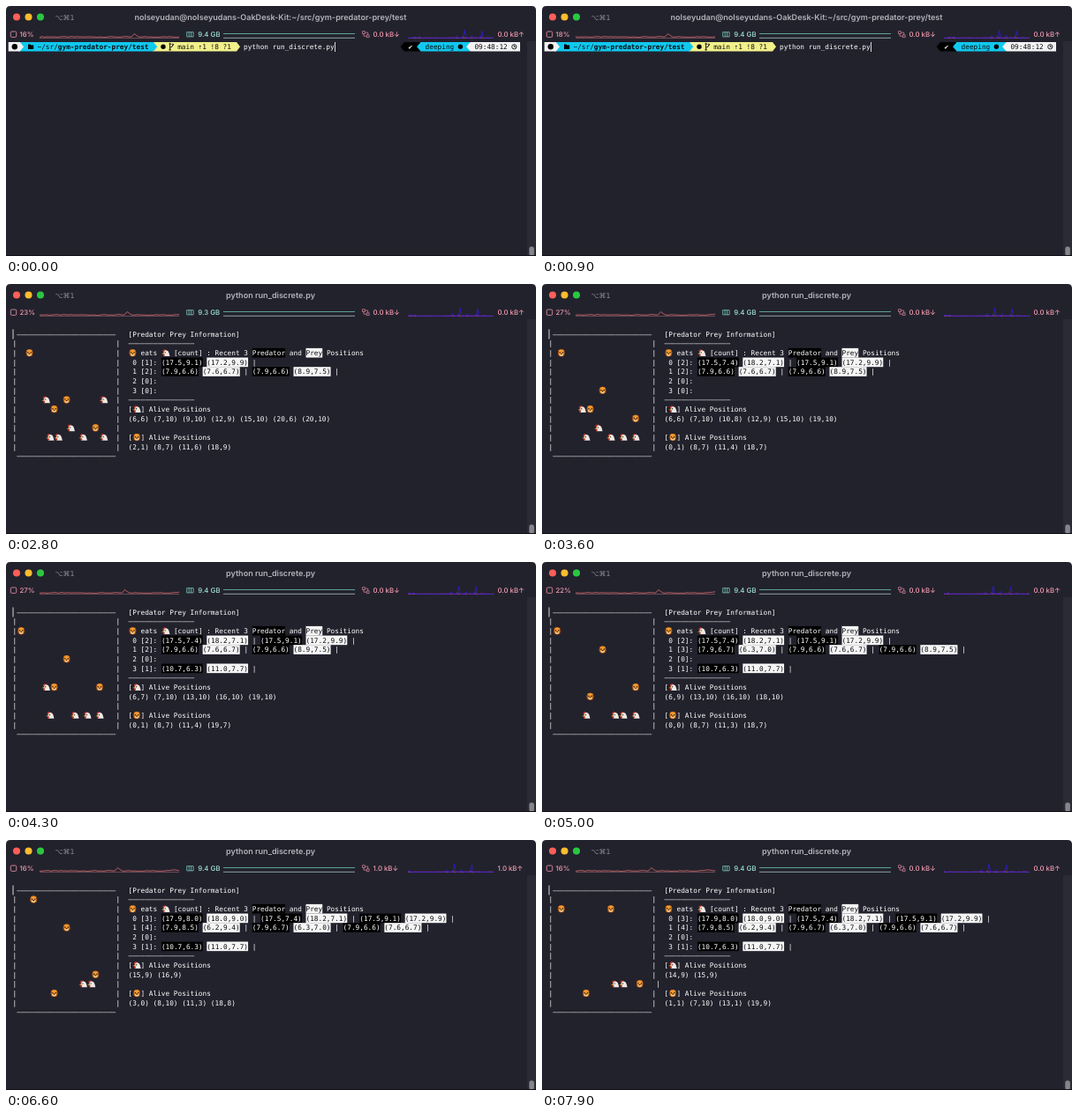
Animation of 600x284 px, one loop 8 s. Source, as an HTML page:

```html
<!DOCTYPE html>
<html lang="en">
<head>
<meta charset="utf-8">
<title>Terminal</title>
<style>
  html, body { margin: 0; width: 100%; height: 100%; overflow: hidden; background: #fff; }
  svg { display: block; width: 600px; height: 284px; }
  text { white-space: pre; text-rendering: geometricPrecision; }
  .mono { font: 7.765px "DejaVu Sans Mono", monospace; fill: #fff; }
  .dark { fill: #0b0b10; }
  .bold { font-weight: 700; }
  .title { font: 600 9.05px Inter, sans-serif; fill: #b4b3bb; text-anchor: middle; }
  .keys { font: 7.9px "DejaVu Sans", sans-serif; fill: #8d8c96; }
  .stat { font: 500 7.8px Inter, "DejaVu Sans", sans-serif; fill: #f29bae; }
  .line { fill: none; stroke-width: .8; stroke-linejoin: round; }
</style>
</head>
<body>
<svg viewBox="0 0 600 284">
  <defs>
    <symbol id="lion" viewBox="0 0 20 20" overflow="visible">
      <path d="M3 3Q10 -1 17 3Q21 10 17 17Q10 21 3 17Q-1 10 3 3Z" fill="#a34e16"/>
      <path d="M3 4Q10 -2 17 4L15 8H5Z" fill="#ea8a22"/>
      <ellipse cx="10" cy="10" rx="6.4" ry="6.4" fill="#f0a036"/>
      <ellipse cx="10" cy="14.6" rx="4.8" ry="3.2" fill="#f7c987"/>
      <circle cx="6.4" cy="9" r="1.7" fill="#3a1c10"/>
      <circle cx="13.6" cy="9" r="1.7" fill="#3a1c10"/>
      <path d="M7 11h6L10 14.4Z" fill="#3a1c10"/>
    </symbol>
    <symbol id="hen" viewBox="0 0 20 20" overflow="visible">
      <path d="M4 8Q1 3 5 3Q6 0 9 2Q12 1 12 6Z" fill="#d23a2c"/>
      <path d="M5 9Q6 3 11.5 3.4Q17 4 18 10Q19 14 20 18H6Q4 14 5 9Z" fill="#efe9e6"/>
      <path d="M6.5 8.5L0 12L6.5 13.5Z" fill="#e2962e"/>
      <path d="M3.5 13.5Q8 12 8 15.5Q6.5 19.5 3.5 17Z" fill="#c2332a"/>
      <circle cx="9" cy="9" r="1.4" fill="#2a1a16"/>
    </symbol>
  </defs>

  <path d="M0 284V5Q0 0 5 0H595Q600 0 600 5V284Z" fill="#22222d"/>
  <rect x="590" y="40" width="10" height="244" fill="#2b2b35"/>
  <rect x="592.3" y="273.3" width="5.6" height="10.2" rx="2.6" fill="#85858c"/>
  <rect y="283" width="600" height="1" fill="#111117"/>
  <circle cx="12" cy="12.5" r="4" fill="#fe5f58"/>
  <circle cx="25.5" cy="12.5" r="4" fill="#febc2f"/>
  <circle cx="39" cy="12.5" r="4" fill="#29c841"/>
  <text class="keys" x="55.5" y="15.8">⌥⌘1</text>
  <text class="title" id="title" x="299.5" y="16"></text>

  <g fill="none" stroke="#e08c9f" stroke-width=".9">
    <rect x="5.3" y="29" width="6.4" height="6.4" rx="1.2"/>
    <path d="M403.5 28.7h2.8v2.8h-2.8ZM408.3 32.8h2.8v2.8h-2.8ZM405 31.5V34.2H408.3M406.3 30.1H409.7V32.8" stroke-width=".7"/>
  </g>
  <path d="M204.7 29.7h7.4v5.2h-7.4ZM207.2 29.7v5.2M209.6 29.7v5.2" fill="none" stroke="#7cc9bb" stroke-width=".8"/>
  <path class="line" d="M38 36.5H196" stroke="#7f5560"/>
  <path class="line" d="M246 36.3H395" stroke="#a9c4c0"/>
  <path class="line" d="M246 31.5H395" stroke="#6cc4b1"/>
  <path class="line" d="M455 36.5H552" stroke="#7d4f86"/>
  <path class="line" id="cpuLine" stroke="#dc6e70"/>
  <path class="line" id="upLine" stroke="#a03478"/>
  <path class="line" id="downLine" stroke="#2f1ce0"/>
  <text class="stat" id="cpu" x="15.5" y="35.2"></text>
  <text class="stat" id="mem" x="217.3" y="35.2" style="fill:#9fe6d6"></text>
  <text class="stat" id="down" x="415.5" y="35.2"></text>
  <text class="stat" id="up" x="556.5" y="35.2"></text>

  <g id="prompt">
    <path d="M166 41H261l4 5.3-4 5.3H166Z" fill="#f1f08a"/>
    <path d="M14 41H167l4.2 5.3-4.2 5.3H14Z" fill="#10c8ee"/>
    <path d="M2.7 41H15.8l4.2 5.3-4.2 5.3H2.7Z" fill="#f2f2f2"/>
    <path d="M451 41H470V51.6H451l-4.4-5.3Z" fill="#000"/>
    <path d="M469.5 41H525V51.6H469.5l-4.4-5.3Z" fill="#10c8ee"/>
    <path d="M525.6 41H582V51.6H525.6l-4.4-5.3Z" fill="#f2f2f2"/>
    <circle cx="9.8" cy="46.3" r="3.2"/>
    <path d="M25 43.6h2.4l.9 1h2.9v4.4H25Z"/>
    <circle cx="178" cy="46.3" r="2.7"/>
    <g fill="none" stroke="#0b0b10" stroke-width=".9">
      <path d="M185.6 43.5v5.6M188.8 44.4q0 2.4-3.2 2.8"/>
      <circle cx="185.6" cy="43" r=".8"/><circle cx="185.6" cy="49.6" r=".8"/><circle cx="188.8" cy="43.8" r=".8"/>
      <circle cx="575.3" cy="46.3" r="2.6"/><path d="M575.3 44.6v1.9h1.4"/>
    </g>
    <circle cx="514.4" cy="46.3" r="2.7"/>
    <text class="mono dark" x="35.5" y="49.2">~/sr/<tspan class="bold">gym-predator-prey/test</tspan></text>
    <text class="mono dark" x="194.2" y="49.2">main ⇡1 !8 ?1</text>
    <text class="mono" x="269" y="49.2">python run_discrete.py</text>
    <text class="mono" x="455.5" y="49.2">✔</text>
    <text class="mono dark" x="474.6" y="49.2">deeping</text>
    <text class="mono dark" x="530.4" y="49.2">09:48:12</text>
  </g>
  <g id="board"></g>
  <rect id="cursor" width="1" height="11" fill="#d6d6da"/>
</svg>

<script>
const LOOP = 8000, ENTER = 2000, RUN = 2800;
const CELL = 4.675, ROW = 10.65, LEFT = 7.6, TOP = 51.6, INFO = 28;
const $ = id => document.getElementById(id);

// Positions at each mark; the optional end is the moment a prey is caught.
const marks = [RUN, 4300, 5800, 6600, 7900];
const lions = [
  { path: [[2, 1], [0, 1], [0, 0], [3, 0], [1, 1]] },
  { path: [[8, 7], [8, 7], [8, 9], [8, 10], [7, 10]] },
  { path: [[11, 6], [11, 4], [11, 2], [11, 3], [13, 1]] },
  { path: [[18, 9], [19, 7], [18, 8], [18, 8], [19, 9]] }
];
const hens = [
  { path: [[6, 6], [6, 7]], end: 4700 },
  { path: [[7, 10], [7, 10], [6, 9]], end: 5400 },
  { path: [[9, 10], [11, 8]], end: 3900 },
  { path: [[12, 9], [13, 10], [15, 10], [15, 9], [14, 9]] },
  { path: [[15, 10], [16, 10], [16, 10], [16.5, 9], [15, 9]] },
  { path: [[20, 6], [18, 7]], end: 3500 },
  { path: [[20, 10], [19, 10], [18, 10], [18, 9]], end: 6200 }
];
const meals = [
  [0, 0, "17.5,9.1", "17.2,9.9"],
  [0, 1, "7.9,6.6", "8.9,7.5"],
  [0, 1, "7.9,6.6", "7.6,6.7"],
  [3500, 0, "17.5,7.4", "18.2,7.1"],
  [3900, 3, "10.7,6.3", "11.0,7.7"],
  [4700, 1, "7.9,6.7", "6.3,7.0"],
  [5400, 1, "7.9,8.5", "6.2,9.4"],
  [6200, 0, "17.9,8.0", "18.0,9.0"]
];

function place({ path }, t) {
  let i = 0;
  while (i < marks.length - 2 && t >= marks[i + 1]) i++;
  const k = Math.min(1, (t - marks[i]) / (marks[i + 1] - marks[i]));
  const a = path[Math.min(i, path.length - 1)];
  const b = path[Math.min(i + 1, path.length - 1)];
  return a.map((v, n) => v + (b[n] - v) * k);
}

const colX = c => LEFT + c * CELL;
const rowY = r => TOP + r * ROW;
const put = (c, r, s, cls = "") =>
  `<text class="mono ${cls}" x="${colX(c)}" y="${rowY(r) + 8.2}">${s}</text>`;
const icon = (id, c, r) =>
  `<use href="#${id}" x="${colX(c) + .3}" y="${rowY(r) + .8}" width="9.2" height="9.2"/>`;
const mark = (c, r, s, dark) =>
  `<rect x="${colX(c)}" y="${rowY(r)}" width="${s.length * CELL}" height="${ROW}" fill="${dark ? "#000" : "#f5f5f5"}"/>`
  + put(c, r, s, dark ? "" : "dark");
const rule = (c, r, n) => put(c, r, "—".repeat(n));

const alive = (list, t) => list.filter(a => !a.end || t < a.end).map(a => place(a, t))
  .sort((a, b) => Math.floor(a[0]) - Math.floor(b[0]) || a[1] - b[1]);
const listing = spots => spots.map(p => `(${p.map(Math.floor)})`).join(" ");

function drawBoard(t) {
  const prey = alive(hens, t), hunters = alive(lions, t);
  const all = [...prey.map(p => ["hen", ...p.map(Math.round)]),
               ...hunters.map(p => ["lion", ...p.map(Math.round)])];
  const shift = [];
  let out = rule(1, 0, 24) + rule(1, 13, 24);

  // A double-width icon directly after another pushes the rest of its line.
  for (let y = 0; y < 12; y++) {
    let push = 0, last = -9;
    for (const [id, x] of all.filter(a => a[2] === y).sort((a, b) => a[1] - b[1])) {
      if (x === last) continue;
      if (x === last + 1) push++;
      out += icon(id, x + 1 + push, y + 1);
      last = x;
    }
    shift[y + 1] = push;
    out += put(0, y + 1, "|") + put(25 + push, y + 1, "|");
  }

  const at = (r, c = 0) => INFO + c + (shift[r] || 0);
  const say = (r, c, s) => put(at(r, c), r, s);
  out += say(0, 0, "[Predator Prey Information]");
  for (const r of [1, 7]) out += rule(at(r), r, 16);
  out += icon("lion", at(2), 2) + say(2, 3, "eats") + icon("hen", at(2, 8), 2)
    + say(2, 11, "[count] : Recent 3 ") + mark(at(2, 30), 2, "Predator", true)
    + say(2, 39, "and") + mark(at(2, 43), 2, "Prey", false) + say(2, 48, "Positions");

  for (let n = 0; n < 4; n++) {
    const r = n + 3, eaten = meals.filter(m => m[1] === n && m[0] <= t).reverse();
    out += say(r, 1, `${n} [${eaten.length}]:`);
    let c = 8;
    for (const [, , by, who] of eaten.slice(0, 3)) {
      const a = `(${by})`, b = `(${who})`;
      out += mark(at(r, c), r, a, true);
      c += a.length + 1;
      out += mark(at(r, c), r, b, false);
      c += b.length + 1;
      out += say(r, c, "|");
      c += 2;
    }
  }
  for (const [id, r, spots] of [["hen", 8, prey], ["lion", 11, hunters]])
    out += say(r, 0, "[") + icon(id, at(r, 1), r) + say(r, 3, "] Alive Positions")
      + say(r + 1, 0, listing(spots));
  return out;
}

// Status graphs: one sample per second, 60 visible.
const loads = [16, 18, 19, 23, 27, 22, 18, 16, 16];
const noise = i => { const v = Math.sin(i * 12.9898) * 43758.5453; return v - Math.floor(v); };
const cpuAt = i => i === 40 ? 5 : i === 41 ? 3 : i >= 60 ? loads[i - 60] / 10 : 1 + noise(i) * .9;
const spikes = { 5: 2, 8: 2, 34: 3, 39: 9, 44: 3, 51: 8 };
const downAt = i => spikes[i] || noise(i + 90) * .3;
const upAt = i => (spikes[i + 1] || 0) * .2 + noise(i + 200) * .5;

function graph(id, x, w, step, value) {
  let d = "";
  for (let i = 0; i <= 59; i++)
    d += `${i ? "L" : "M"}${(x + i * w / 59).toFixed(2)} ${(36.5 - value(i + step)).toFixed(2)}`;
  $(id).setAttribute("d", d);
}

function drawStatus(step) {
  graph("cpuLine", 38, 158, step, cpuAt);
  graph("upLine", 455, 97, step, upAt);
  graph("downLine", 455, 97, step, downAt);
  const rate = step === 7 ? "1.0" : "0.0";
  $("cpu").textContent = loads[step] + "%";
  $("mem").textContent = (step === 3 ? "9.3" : "9.4") + " GB";
  $("down").textContent = rate + " kB↓";
  $("up").textContent = rate + " kB↑";
}

let shown = -1;
function frame() {
  const t = Math.floor(performance.now() % LOOP / 100) * 100;
  if (t !== shown) {
    shown = t;
    const running = t >= RUN, entered = t >= ENTER;
    drawStatus(Math.floor((t + 400) / 1000));
    $("title").textContent = entered ? "python run_discrete.py"
      : "nolseyudan@nolseyudans-OakDesk-Kit:~/src/gym-predator-prey/test";
    $("prompt").style.display = running ? "none" : "";
    $("board").innerHTML = running ? drawBoard(t) : "";
    $("cursor").setAttribute("x", running ? 7.5 : entered ? 2.5 : 372);
    $("cursor").setAttribute("y", entered ? 51.5 : 41);
  }
  requestAnimationFrame(frame);
}
frame();
</script>
</body>
</html>
```
